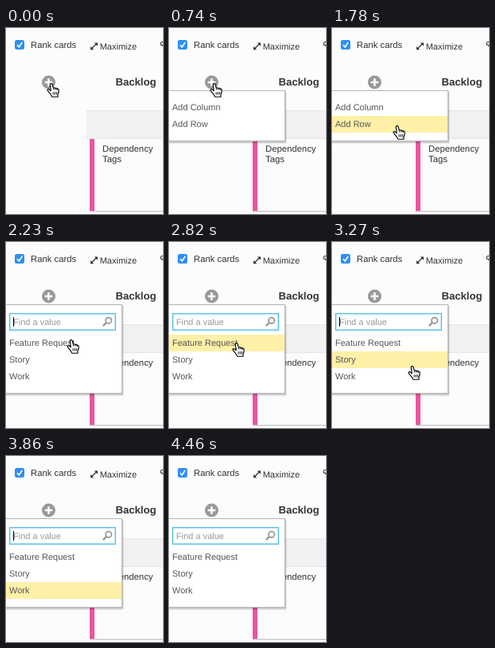
An HTML page that plays this animation: 197 px wide and 233 px high, repeating every 4610 ms.

```html
<!DOCTYPE html>
<html lang="en">
<head>
<meta charset="utf-8">
<title>Add a row</title>
<style>
html, body { margin: 0; width: 100%; height: 100%; overflow: hidden; background: #fcfcfc; }
svg { display: block; width: 100%; height: 100%; }
text { font: 11.3px "Liberation Sans", Arial, sans-serif; fill: #333; text-rendering: geometricPrecision; }
.menu text { fill: #555; font-size: 11px; }
.menu .hint { fill: #999; }
.title { font-size: 13.1px; font-weight: bold; }
</style>
</head>
<body>
<svg viewBox="0 0 197 233">
  <rect width="197" height="233" fill="#fcfcfc"/>

  <rect x="11" y="15" width="12" height="12" rx="2.5" fill="#2f8ff7"/>
  <path d="M14 21.3l2.3 2.6 4-6" fill="none" stroke="#fff" stroke-width="1.7"/>
  <text x="31" y="25">Rank cards</text>
  <path d="M110.8 18.5h4.2v4.2zM106 23v4.2h4.2z" fill="#333"/>
  <path d="M107.5 25.8l6-6" stroke="#333" stroke-width="1.3"/>
  <text x="117.7" y="27" style="font-size:11px">Maximize</text>
  <g fill="none" stroke="#444" stroke-width="1.2">
    <circle cx="196" cy="19.5" r="2"/>
    <path d="M196 21.5l2 2.5"/>
  </g>

  <circle cx="53.5" cy="68" r="8.5" fill="#999"/>
  <path d="M53.5 63.2v9.6M48.7 68h9.6" stroke="#fff" stroke-width="2.6"/>
  <text class="title" x="137.5" y="72">Backlog</text>

  <rect x="101" y="103" width="96" height="35" fill="#f1f1f1"/>
  <path d="M101 103.5h96M101 138.5h96" stroke="#e6e6e6"/>
  <rect x="105" y="139" width="6" height="90" fill="#ea559f"/>
  <path d="M105 229.5h92" stroke="#c4c4c4"/>
  <path d="M105 230.5h92" stroke="#ececec"/>
  <text x="121" y="155">Dependency</text>
  <text x="121" y="168">Tags</text>

  <g id="menu" class="menu">
    <rect class="sheet" x="-4" y="80" width="152" fill="#000" opacity=".07" rx="2"/>
    <rect class="sheet" x="-4" y="79" width="151" fill="#000" opacity=".13" rx="1"/>
    <rect class="sheet" x="-4.5" y="78.5" width="150" fill="#fff" stroke="#b4b4b4"/>
    <rect id="mark" width="145" height="21" fill="#fff0a8"/>
    <g id="search">
      <rect x="5.5" y="90.5" width="131" height="19" fill="#fff" stroke="#b5e3f5"/>
      <rect x="4.5" y="89.5" width="133" height="21" fill="none" stroke="#55c0e8"/>
      <text class="hint" x="9" y="104">Find a value</text>
      <circle cx="128.7" cy="98.3" r="3.7" fill="none" stroke="#999" stroke-width="1.8"/>
      <path d="M125.8 101.2l-4 4" stroke="#999" stroke-width="2.4"/>
      <rect id="caret" x="9" y="94" width="1" height="12" fill="#000"/>
    </g>
    <g id="items"></g>
  </g>

  <g id="hand">
    <path d="M4.3 2.4C4 .3 6.7 0 7.2 1.9L8.3 6.2C9.2 5.4 10.4 5.7 10.7 6.6 11.6 5.9 12.8 6.4 13 7.3 14.3 6.9 15.1 7.7 15.2 9 15.4 11.5 14.8 12.8 14 14.3V17.2H6.6C6.2 15.2 4.6 13.7 3.4 12.1 2.6 10.9 1.7 10.2 1.1 9.3.6 8 2.1 7.2 3.3 8.1L5.3 9.7Z"
      fill="#fff" stroke="#000" stroke-width="1.15" stroke-linejoin="round"/>
    <path d="M8.2 11.2v3.4M10.3 11v3.6M12.4 11v3.5M8.3 6.2l.5 2.3M10.7 6.6l.3 2M13 7.3l.2 1.7" fill="none" stroke="#000" stroke-width=".9"/>
  </g>
</svg>
<script>
const LOOP = 4610, TICK = LOOP / 31;  // the screen refreshes 31 times per loop
const ROW = 21;
const HAND_GONE = 26, HOVER_ENDS = 28;

const menus = [
  { opens: 5, top: 89, bottom: 142, items: ["Add Column", "Add Row"] },
  { opens: 15, top: 116, bottom: 190, items: ["Feature Request", "Story", "Work"], search: true }
];

const home = [51, 69];
const glides = [
  { start: 7.3, span: 4.7, to: [76, 122] },
  { start: 18.85, span: 2.8, to: [95, 155] },
  { start: 23.3, span: 1.7, to: [109, 175] }
];

const $ = id => document.getElementById(id);
const show = (id, on) => $(id).style.display = on ? "" : "none";
const clamp = u => Math.min(1, Math.max(0, u));
const easeOut = u => 1 - (1 - u) ** 2.6;

function handAt(tick) {
  return glides.reduce((from, { start, span, to }) => {
    const k = easeOut(clamp((tick - start) / span));
    return from.map((v, i) => v + (to[i] - v) * k);
  }, home).map(Math.round);
}

function drawMenu(menu, tick, y) {
  document.querySelectorAll(".sheet").forEach((sheet, i) =>
    sheet.setAttribute("height", menu.bottom - 79 + (i < 2 ? 2 : 0)));
  $("items").innerHTML = menu.items.map((item, i) =>
    `<text x="4" y="${menu.top + 14 + i * ROW}">${item}</text>`).join("");

  const row = Math.floor((y - menu.top) / ROW);
  show("mark", menu.items[row] && tick > menu.opens && tick < HOVER_ENDS);
  $("mark").setAttribute("y", menu.top + row * ROW);

  show("search", menu.search);
  show("caret", (tick - menu.opens) % 5.5 < 4);
}

function draw(t) {
  const tick = Math.floor((t + 8) / TICK);
  const [x, y] = handAt(tick);
  const menu = menus.filter(m => tick >= m.opens).pop();

  show("menu", menu);
  if (menu) drawMenu(menu, tick, y);
  show("hand", tick < HAND_GONE);
  $("hand").setAttribute("transform", `translate(${x} ${y})`);
}

const begin = performance.now();
function play() {
  draw((performance.now() - begin) % LOOP);
  requestAnimationFrame(play);
}
play();
</script>
</body>
</html>
```
